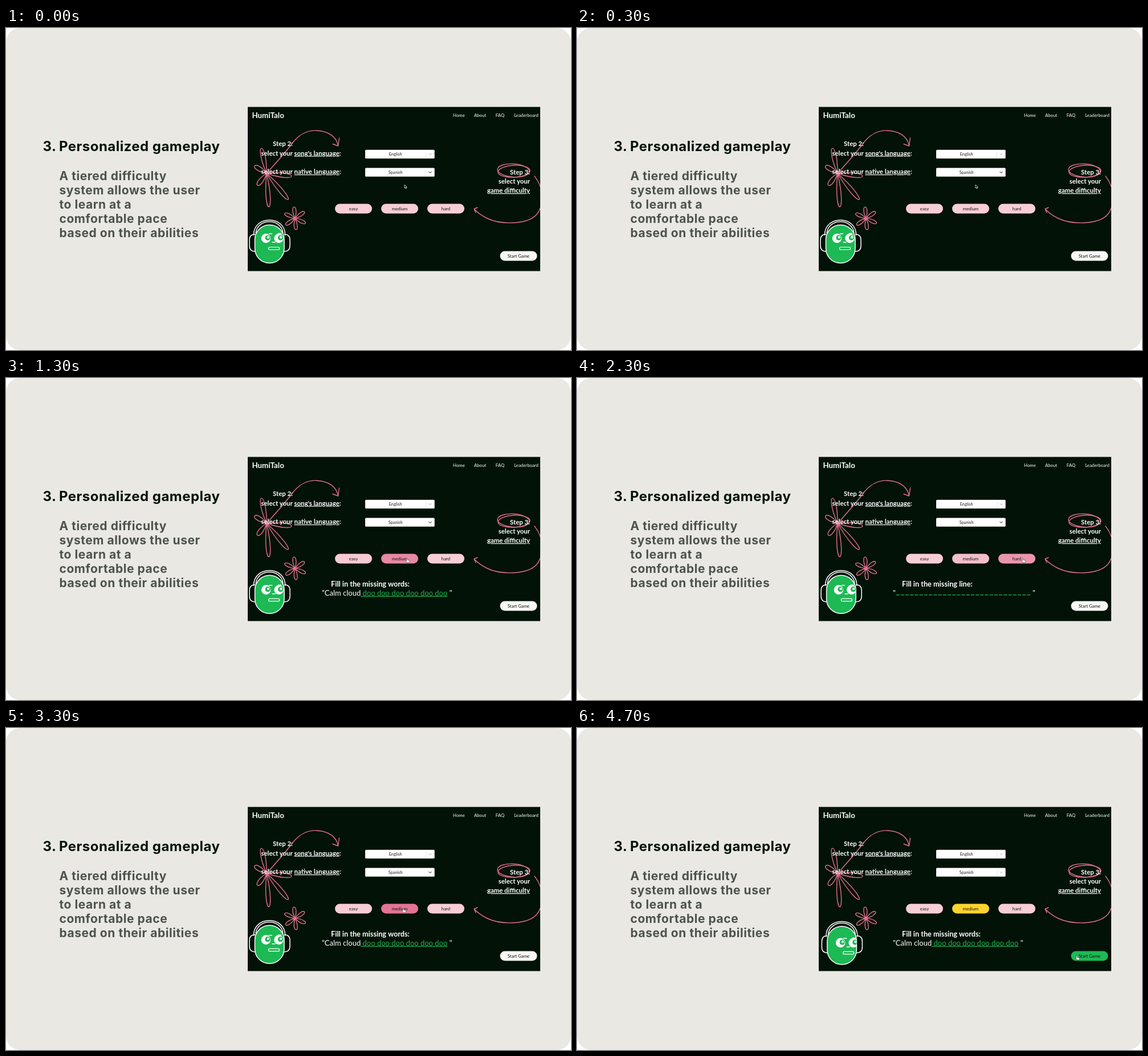
These frames come from a looping animation (991 by 565 pixels, 4.9 s). An HTML page:

```html
<!DOCTYPE html>
<html lang="en">
<head>
<meta charset="utf-8">
<title>Personalized gameplay</title>
<style>
  html, body { margin: 0; width: 100%; height: 100%; overflow: hidden; background: #fff; }
  svg { display: block; width: 991px; height: 565px; font-family: Lato, sans-serif; font-size: 7.8px; }
  .copy { font: 700 21px Inter, sans-serif; letter-spacing: .54px; }
  .title { font-size: 24px; letter-spacing: .46px; fill: #021206; }
  .white { fill: #fff; }
  .step { font-size: 11.4px; font-weight: 700; fill: #fff; }
  .u { text-decoration: underline; }
  .mid { text-anchor: middle; }
  .end { text-anchor: end; }
  .doodle { fill: none; stroke: #e0718f; stroke-width: 1.4; stroke-linecap: round; stroke-linejoin: round; }
  .line { fill: none; stroke: #fff; stroke-width: 1.5; }
  .chevron { fill: none; stroke: #ccc; stroke-width: 1.2; }
  .prompt { font-size: 12.7px; font-weight: 700; fill: #fff; }
  .lyric { font-size: 13px; fill: #fff; }
  .green { fill: #1fae50; }
</style>
</head>
<body>
<svg viewBox="0 0 991 565">
  <defs>
    <clipPath id="screenClip"><rect x="424" y="138.6" width="513" height="288"/></clipPath>
    <clipPath id="headClip"><rect x="436.5" y="345.5" width="51.5" height="67" rx="25.7"/></clipPath>
  </defs>
  <rect width="991" height="565" rx="25" fill="#e9e8e3"/>
  <g class="copy">
    <text class="title" x="64.5" y="216">3.</text>
    <text class="title" x="93" y="216">Personalized gameplay</text>
    <g id="body"></g>
  </g>

  <g id="screen" clip-path="url(#screenClip)">
    <rect x="424" y="138" width="513" height="289" fill="#021206"/>
    <text x="431.5" y="158" class="white" font-size="13.3" font-weight="700">HumiTalo</text>
    <g class="white mid">
      <text x="794.5" y="156">Home</text><text x="831.5" y="156">About</text>
      <text x="866.5" y="156">FAQ</text><text x="912.5" y="156">Leaderboard</text>
    </g>

    <g class="doodle">
      <path id="flowers"/>
      <path d="M457 255C474 236 490 219 503 201C514 187 529 179 545 180C566 181 580 191 582.5 207M573 203.5L582.5 207L584.5 193"/>
      <ellipse cx="890" cy="250" rx="28" ry="11.5" transform="rotate(4 890 250)"/>
      <ellipse cx="891" cy="251.5" rx="28" ry="10.5" transform="rotate(-3 891 251.5)"/>
      <path d="M927 260C947 285 941 315 931 327C914 346 867 345 844 334C834 329 827 324 821 317.5M827 315L821 317.5L824 324"/>
    </g>

    <g class="step">
      <text x="468" y="207">Step 2:</text>
      <text x="447.5" y="223.5">select your <tspan x="505.5" class="u">song's language</tspan>:</text>
      <text x="447.5" y="256">select your <tspan x="505.5" class="u">native language</tspan>:</text>
      <g class="end">
        <text x="919" y="256.5">Step 3:</text>
        <text x="919" y="273">select your</text>
        <text x="919" y="289" class="u">game difficulty</text>
      </g>
    </g>

    <g id="selects"></g>
    <g id="buttons"></g>

    <g id="mascot">
      <path class="line" d="M434.5 364C433 328 491 328 489.5 364"/>
      <path class="line" d="M438 360C441 333 483 333 486 360"/>
      <path class="line" d="M437 362C430 362 427 366 427 372V382C427 388 430 392 437 392M488 362C495 362 498 366 498 372V382C498 388 495 392 488 392"/>
      <rect class="line" x="436.5" y="345.5" width="51.5" height="67" rx="25.7" style="fill:#1db954"/>
      <g clip-path="url(#headClip)">
        <g id="face">
          <g id="eyes"></g>
          <path class="line" d="M461 361H467M477 360.5H483M466.5 376H472.5"/>
          <rect class="line" x="460.5" y="384.5" width="19" height="4.5" rx="2" style="stroke-width:1.2"/>
        </g>
      </g>
    </g>

    <g id="hint">
      <text id="prompt" class="prompt" x="570" y="365.5"></text>
      <g id="words">
        <text class="lyric" x="554" y="381.5">"Calm cloud<tspan id="known"></tspan><tspan id="missing" class="green u"></tspan> "</text>
      </g>
      <g id="blank">
        <text class="lyric" x="554" y="381.5">"</text><text class="lyric" x="799" y="381.5">"</text>
        <path d="M559.5 380.7H797" stroke="#1fae50" stroke-width="1.2" stroke-dasharray="6.4 1.8"/>
      </g>
    </g>

    <g id="cursor" stroke-linejoin="round">
      <path id="arrow" d="M0 0V6L1.4 4.8L2.5 7L3.5 6.5L2.5 4.4H4.3Z" fill="#021206" stroke="#fff" stroke-width=".7"/>
      <path id="hand" d="M-1 0Q0 -1 .8 0V2.3L4 3Q5 3.3 4.5 5L3.6 7H.2L-2.5 3.8Q-2 2.6 -1 3.6Z" fill="#fff" stroke="#444" stroke-width=".7"/>
    </g>
  </g>
</svg>

<script>
const $ = id => document.getElementById(id);
const LOOP = 4900, STEP = 100, FADE = 220;
const PINK = [247, 206, 214], ROSE = [227, 116, 151], YELLOW = [253, 212, 47];
const PAPER = [248, 248, 246], GREEN = [29, 185, 84];
const WIDTH = 65, HEIGHT = 17;

const pink = (label, i) => ({ label, x: 577 + 81 * i, y: 308.5, base: PINK, hot: ROSE });
const easy = pink('easy', 0), medium = pink('medium', 1), hard = pink('hard', 2);
const play = { label: 'Start Game', x: 866.5, y: 391.5, base: PAPER, hot: GREEN };
const buttons = [easy, medium, hard, play];

// The pointer glides from rest to one button after another.
const rest = { x: 699, y: 275 };
const visits = [
  { to: easy, leave: 400, arrive: 900, at: .7 },
  { to: medium, leave: 1000, arrive: 1300, at: .7 },
  { to: hard, leave: 2030, arrive: 2330, at: .7 },
  { to: medium, leave: 2600, arrive: 3200, at: .6 },
  { to: play, leave: 3650, arrive: 4500, at: .16 }
];
const clickTime = visits[4].leave;

const ease = p => p * p * (3 - 2 * p);
const clamp = p => Math.min(1, Math.max(0, p));
const mix = (a, b, p) => `rgb(${a.map((v, i) => Math.round(v + (b[i] - v) * p))})`;
const show = (id, on) => $(id).style.display = on ? '' : 'none';
const move = (id, x, y) => $(id).setAttribute('transform', `translate(${x} ${y})`);

function pointer(t) {
  return visits.reduce((from, { to, leave, arrive, at }) => {
    const p = ease(clamp((t - leave) / (arrive - leave)));
    return {
      x: from.x + (to.x + WIDTH * at - from.x) * p,
      y: from.y + (to.y + HEIGHT / 2 - from.y) * p
    };
  }, rest);
}

const inside = (b, { x, y }) => x > b.x && x < b.x + WIDTH && y > b.y && y < b.y + HEIGHT;

// Share of the last FADE ms the pointer spent on the button.
function heat(button, t) {
  let hits = 0;
  for (let ago = 0; ago < FADE; ago += 10) hits += inside(button, pointer(t - ago));
  return hits * 10 / FADE;
}

// A petal is a cubic loop from the centre whose far point is the tip.
function petal(cx, cy, dx, dy, width) {
  const len = Math.hypot(dx, dy), ox = -dy / len * width, oy = dx / len * width;
  const px = cx + dx * 1.33, py = cy + dy * 1.33;
  return `M${cx} ${cy}C${px + ox} ${py + oy} ${px - ox} ${py - oy} ${cx} ${cy}`;
}

function flowers() {
  const large = [[-9, -44], [-21, -13], [-16, 21], [4, 59], [38, 46], [44, 5]]
    .map(([dx, dy]) => petal(457, 255, dx, dy, 13));
  const small = [0, 1, 2, 3, 4, 5].map(i => {
    const angle = (i * 60 - 95) * Math.PI / 180;
    return petal(507, 334, 20 * Math.cos(angle), 20 * Math.sin(angle), 10);
  });
  return [...large, ...small].join('');
}

function build() {
  $('body').innerHTML = ['A tiered difficulty', 'system allows the user', 'to learn at a',
    'comfortable pace', 'based on their abilities']
    .map((line, i) => `<text x="93.5" y="${266.5 + i * 25}">${line}</text>`).join('');
  $('flowers').setAttribute('d', flowers());
  $('selects').innerHTML = ['English', 'Spanish'].map((label, i) => {
    const y = 213.7 + i * 31.7;
    return `<rect x="630" y="${y}" width="121.7" height="15.4" rx="1.5" fill="#fff"/>
      <text class="mid" x="683.2" y="${y + 10.5}" fill="#222" font-size="7.4">${label}</text>
      <path id="divider${i}" d="M736.5 ${y + 3}v9.5" stroke="#ddd" stroke-width=".7"/>
      <path id="chevron${i}" class="chevron" d="M741.5 ${y + 6.5}l2.5 2.5l2.5 -2.5"/>`;
  }).join('');
  $('buttons').innerHTML = buttons.map((b, i) => `
    <rect id="button${i}" x="${b.x}" y="${b.y}" width="${WIDTH}" height="${HEIGHT}" rx="8.5"/>
    <text class="mid" x="${b.x + WIDTH / 2}" y="${b.y + 11.2}" fill="#111">${b.label}</text>`).join('');
  $('eyes').innerHTML = [456, 478.5].map(x => `
    <circle cx="${x}" cy="369" r="8.3" fill="#fff"/>
    <circle cx="${x + 3}" cy="368" r="4.6" fill="#1db954"/>
    <circle cx="${x + 3.8}" cy="367.2" r="2.2" fill="#fff"/>`).join('');
}

function setHint(t) {
  const level = visits.filter(v => v.to !== play && t >= (v.leave + v.arrive) / 2).pop()?.to;
  show('hint', level);
  show('words', level !== hard);
  show('blank', level === hard);
  const noun = level === hard ? 'line' : level === easy ? 'word' : 'words';
  $('prompt').textContent = `Fill in the missing ${noun}:`;
  const known = level === easy ? 5 : 0;
  $('known').textContent = ' doo'.repeat(known);
  $('missing').textContent = ' doo'.repeat(6 - known);
}

function draw(now) {
  const t = Math.floor(now % LOOP / STEP) * STEP;
  const empty = t >= 100 && t < 300, clicked = t >= clickTime;
  show('screen', !empty);
  $('body').setAttribute('fill', empty ? '#434343' : '#4c524c');

  const spot = pointer(t), over = buttons.some(b => inside(b, spot));
  move('cursor', spot.x, spot.y);
  show('hand', over);
  show('arrow', !over);

  // The mascot leans toward the pointer, its face more than its head.
  const dx = spot.x - rest.x, dy = spot.y - rest.y;
  move('mascot', dx * .0135, dy * .02);
  move('face', dx * .0215, dy * .043);

  buttons.forEach((b, i) => {
    const base = b === medium && clicked ? YELLOW : b.base;
    $('button' + i).setAttribute('fill', mix(base, base === YELLOW ? YELLOW : b.hot, heat(b, t)));
  });
  $('chevron1').style.stroke = clicked ? '#ccc' : '#666';
  show('divider1', clicked);
  setHint(t);
}

build();
const start = performance.now();
function tick() {
  draw(performance.now() - start);
  requestAnimationFrame(tick);
}
tick();
</script>
</body>
</html>
```
